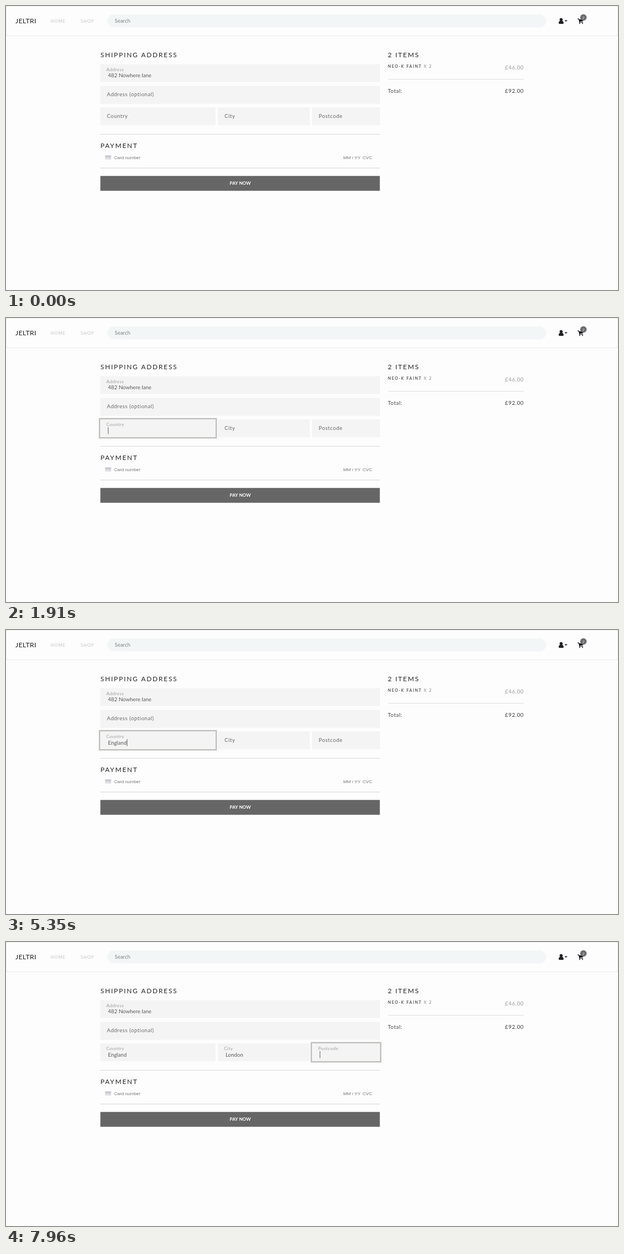
Recreate the animation shown at these times as an HTML page with a canvas. Size 1098 by 510 pixels, loop 8000 ms.

```html
<!DOCTYPE html>
<html lang="en">
<head>
<meta charset="utf-8">
<title>Checkout form</title>
<style>
  html, body { margin: 0; width: 100%; height: 100%; overflow: hidden; background: #fdfdfd; }
  canvas { display: block; width: 1098px; height: 510px; }
</style>
</head>
<body>
<canvas id="stage"></canvas>
<script>
const W = 1098, H = 510, LOOP = 8000, BLINK = 530;
const SANS = 'Lato, sans-serif';
const ARIAL = '"Liberation Sans", Arial, sans-serif';
const LEFT = 169, RIGHT = 671, ROW_Y = 182, ROW_H = 32;
const FIELD = '#f4f4f5';

const canvas = document.getElementById('stage');
const ctx = canvas.getContext('2d');
const dpr = window.devicePixelRatio || 1;
canvas.width = W * dpr;
canvas.height = H * dpr;

const fields = [
  { x: 169, w: 207, label: 'Country', focus: 850, blur: 5740 },
  { x: 380, w: 165, label: 'City', focus: 5740, blur: 7420 },
  { x: 549, w: 122, label: 'Postcode', focus: 7420, blur: LOOP + 1 }
];

// [time, field, value]; a repeated value only restarts the caret blink
const edits = [
  [2700, 0, 'E'], [3280, 0, 'En'], [3680, 0, 'Eng'], [4010, 0, 'Engl'],
  [4100, 0, 'Engla'], [4260, 0, 'Englan'], [4310, 0, 'Englans'], [4360, 0, 'Englansd'],
  [4970, 0, 'Englans'], [5040, 0, 'Englan'], [5350, 0, 'England'],
  [6370, 1, 'L'], [6630, 1, 'Lo'], [6780, 1, 'Lon'], [6870, 1, 'Lond'],
  [6950, 1, 'Londo'], [7100, 1, 'London'], [7480, 2, '']
];

const clamp = v => Math.max(0, Math.min(1, v));
const ease = v => { v = clamp(v); return v * v * (3 - 2 * v); };
const mix = (a, b, k) => a + (b - a) * k;

function rect(x, y, w, h, color) {
  ctx.fillStyle = color;
  ctx.fillRect(x, y, w, h);
}

function disc(x, y, r, color) {
  ctx.fillStyle = color;
  ctx.beginPath();
  ctx.arc(x, y, r, 0, Math.PI * 2);
  ctx.fill();
}

function poly(points, color) {
  ctx.fillStyle = color;
  ctx.beginPath();
  points.forEach(([x, y]) => ctx.lineTo(x, y));
  ctx.closePath();
  ctx.fill();
}

function text(str, x, y, size, color, { gap = 0, weight = 400, family = SANS, align = 'left' } = {}) {
  ctx.font = `${weight} ${size}px ${family}`;
  ctx.letterSpacing = gap + 'px';
  ctx.textAlign = align;
  ctx.fillStyle = color;
  ctx.fillText(str, x, y);
  return ctx.measureText(str).width;
}

const heading = (str, x, y) => text(str, x, y, 11.8, '#222', { gap: 1.8 });
const value = (str, x, y) => text(str, x, y, 9.6, '#5c5c5c');

// k runs from resting (0) to floated (1)
function label(str, x, top, k) {
  const grey = Math.round(mix(104, 156, k));
  ctx.save();
  ctx.translate(mix(x + 12, x + 11, k), mix(top + 19, top + 12, k));
  ctx.scale(mix(1, 0.85, k), mix(1, 0.85, k));
  text(str, 0, 0, 9.5, `rgb(${grey},${grey},${grey})`, { gap: 0.55 });
  ctx.restore();
}

function userIcon() {
  const ink = '#1c1c22';
  disc(996, 24.5, 2.7, ink);
  ctx.beginPath();
  ctx.moveTo(992, 32);
  ctx.bezierCurveTo(991.2, 29.5, 992, 27, 994, 26.7);
  ctx.lineTo(998, 26.7);
  ctx.bezierCurveTo(1000, 27, 1000.8, 29.5, 1000, 32);
  ctx.fill();
  poly([[1002, 25.5], [1007.3, 25.5], [1004.65, 28.2]], ink);
}

function cartIcon() {
  const ink = '#1c1c22';
  rect(1025.3, 22.5, 2.6, 1.1, ink);
  poly([[1027, 22.5], [1028, 22.5], [1029.5, 29.2], [1028.4, 29.2]], ink);
  poly([[1027.8, 23.8], [1035.8, 23.8], [1035.2, 27.6], [1028.6, 28.4]], ink);
  rect(1028.4, 28.9, 6.8, 1, ink);
  disc(1029.3, 31.3, 1, ink);
  disc(1034.3, 31.3, 1, ink);
  disc(1036, 20.5, 5.8, '#6c6c6e');
  text('2', 1036, 22.8, 6, '#e4e4e4', { align: 'center' });
}

function header() {
  ctx.strokeStyle = '#ebebe8';
  ctx.lineWidth = 1;
  ctx.strokeRect(0.5, 0.5, W - 1, 53);
  text('JELTRI', 17, 31, 12, '#1c1c1c', { gap: 0.4 });
  text('HOME', 80, 29.5, 7.6, '#c2c2c8', { gap: 0.9 });
  text('SHOP', 134, 29.5, 7.6, '#c2c2c8', { gap: 0.9 });
  ctx.fillStyle = '#f3f6f6';
  ctx.beginPath();
  ctx.roundRect(182, 15, 787, 23.5, 11.7);
  ctx.fill();
  text('Search', 195, 30, 9.5, '#808080');
  userIcon();
  cartIcon();
}

function summary() {
  heading('2 ITEMS', 685, 92);
  const w = text('NEO-K FAINT ', 685, 110.6, 7, '#555', { gap: 1.55, weight: 700 });
  text('X 2', 685 + w, 110.6, 7, '#808080', { gap: 1.55 });
  text('£46.00', 929, 114.3, 9.6, '#999', { gap: 0.6, align: 'right' });
  rect(685, 131, 244, 1, '#dededc');
  text('Total:', 685, 156, 9.6, '#444', { gap: 0.6 });
  text('£92.00', 929, 156, 9.6, '#3a3a3a', { gap: 0.6, align: 'right' });
}

function payment() {
  rect(LEFT, 230, RIGHT - LEFT, 1, '#d9d9de');
  heading('PAYMENT', 169.5, 254.7);
  rect(178, 268, 10.5, 7.5, '#d8d9de');
  rect(178, 269.5, 10.5, 1.5, '#bfc0c7');
  rect(179.5, 273, 4, 1, '#f2f2f4');
  const plain = { family: ARIAL };
  text('Card number', 194, 274.7, 8.1, '#757575', plain);
  text('MM / YY', 605, 274.7, 8.1, '#757575', plain);
  text('CVC', 640, 274.7, 8.1, '#757575', plain);
  rect(LEFT, 290.5, RIGHT - LEFT, 1, '#d6d6da');
  rect(LEFT + 0.3, 305.2, RIGHT - LEFT - 0.6, 26.6, '#666');
  text('PAY NOW', 420.3, 321, 8.1, '#fff', { weight: 700, align: 'center' });
}

function address() {
  heading('SHIPPING ADDRESS', 169.5, 92);
  rect(LEFT, 104.5, RIGHT - LEFT, ROW_H, FIELD);
  label('Address', LEFT, 104.5, 1);
  value('482 Nowhere lane', 183, 128);
  rect(LEFT, 143.5, RIGHT - LEFT, ROW_H, FIELD);
  label('Address (optional)', LEFT, 143, 0);
}

// The ring widens and darkens together
function ring(f, k) {
  if (k <= 0) return;
  const width = 2.4 * k;
  ctx.globalAlpha = k;
  ctx.strokeStyle = '#bfc0bb';
  ctx.lineWidth = width;
  ctx.strokeRect(f.x - width / 2, ROW_Y - width / 2, f.w + width, ROW_H + width);
  ctx.globalAlpha = 1;
}

function caretOn(t, f, i) {
  if (t < f.focus || t >= f.blur) return false;
  const last = edits.reduce((a, e) => e[1] === i && e[0] <= t ? e[0] : a, f.focus);
  return (t - last) % (2 * BLINK) < BLINK;
}

function inputRow(t) {
  fields.forEach(f => rect(f.x, ROW_Y, f.w, ROW_H, FIELD));
  fields.forEach((f, i) => {
    ring(f, ease((t - f.focus) / 160) - ease((t - f.blur) / 160));
    const typed = edits.reduce((a, e) => e[1] === i && e[0] <= t ? e[2] : a, '');
    const x = f.x + 14;
    const w = value(typed, x, 205.6);
    label(f.label, f.x, ROW_Y, ease((t - f.focus) / 100));
    if (caretOn(t, f, i)) rect(Math.round(x + w) - 0.2, 196, 1, 12.5, '#666');
  });
}

// The pointer advances in 70 ms jumps
function pointer(t) {
  if (t < 1240 || t >= 1740) return;
  const k = ease(Math.floor((t - 1240) / 70) / 6);
  ctx.save();
  ctx.translate(mix(31, 256, k), mix(367, 196, k));
  ctx.beginPath();
  [[0, 0], [0, 9.2], [2.1, 7.4], [3.5, 10.6], [5, 10], [3.6, 6.9], [6, 6.6]]
    .forEach(([x, y]) => ctx.lineTo(x, y));
  ctx.closePath();
  ctx.fillStyle = '#fff';
  ctx.fill();
  ctx.strokeStyle = '#55555c';
  ctx.lineWidth = 0.9;
  ctx.stroke();
  ctx.restore();
}

function draw(t) {
  ctx.setTransform(dpr, 0, 0, dpr, 0, 0);
  rect(0, 0, W, H, '#fdfdfd');
  header();
  summary();
  address();
  inputRow(t);
  payment();
  pointer(t);
}

const start = performance.now();
function tick() {
  draw((performance.now() - start) % LOOP);
  requestAnimationFrame(tick);
}
tick();
</script>
</body>
</html>
```
